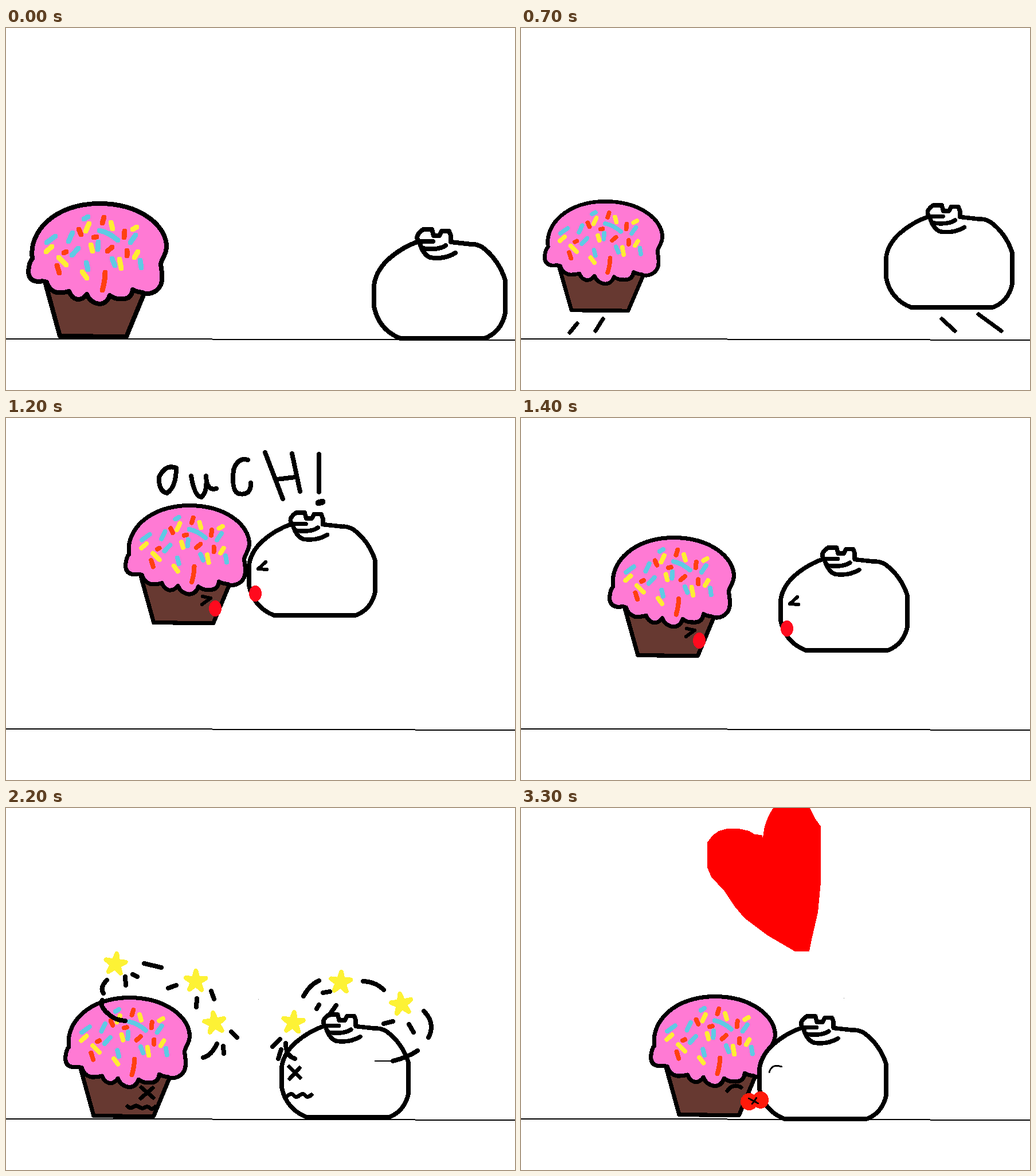
Animation of 888x631 px, one loop 3.4 s. Source, as an HTML page:

```html
<!DOCTYPE html>
<html>
<head>
<meta charset="utf-8">
<style>
html, body { margin: 0; width: 100%; height: 100%; overflow: hidden; background: #fff; }
svg { display: block; width: 888px; height: 631px; shape-rendering: crispEdges; fill: none; stroke-linecap: round; stroke-linejoin: round; }
</style>
</head>
<body>
<svg id="stage" viewBox="0 0 888 631"></svg>
<script>
const STEP = 100, STEPS = 34;
const stage = document.getElementById('stage');

// step, cupcake x y w h, dumpling x y w h
const POSES = [
  [0, 34, 302, 250, 241, 638, 347, 238, 198],
  [3, 34, 322, 247, 221, 636, 362, 243, 183],
  [6, 36, 312, 226, 216, 635, 338, 233, 196],
  [7, 37, 299, 213, 198, 633, 305, 229, 186],
  [10, 140, 190, 220, 208, 507, 200, 229, 187],
  [12, 204, 149, 224, 213, 420, 161, 229, 187],
  [14, 150, 205, 225, 214, 449, 222, 230, 187],
  [16, 99, 327, 225, 215, 477, 356, 230, 187],
  [22, 99, 327, 225, 215, 477, 356, 230, 187],
  [26, 212, 326, 225, 215, 428, 358, 230, 187],
  [30, 222, 325, 225, 215, 412, 359, 230, 187]
];

const line = (d, w = 7, color = '#000', fill = 'none') =>
  `<path d="${d}" stroke="${color}" stroke-width="${w}" fill="${fill}"/>`;
const blob = (x, y, rx, ry, color = '#ff0a1e') =>
  `<ellipse cx="${x}" cy="${y}" rx="${rx}" ry="${ry}" fill="${color}"/>`;
const move = (x, y, body) => `<g transform="translate(${x} ${y})">${body}</g>`;
const fit = ([x, y, w, h], [bx, by, bw, bh], body) =>
  `<g transform="translate(${x} ${y}) scale(${w / bw} ${h / bh}) translate(${-bx} ${-by})">${body}</g>`;

const CUP_BOX = POSES[0].slice(1, 5), BUN_BOX = POSES[0].slice(5);

const CUP =
  line('M69 446L94 537L210 538L243 458', 8, '#000', '#673931') +
  line('M46 402C39 355 85 306 163 306C235 306 280 345 280 381C280 395 271 403 270 412C272 425 274 438 270 448C262 464 245 465 238 461Q228 460 221 456Q219 474 200 472Q190 473 181 466Q176 481 162 481Q146 478 141 464Q134 474 124 473Q114 470 110 459Q100 462 88 461Q75 457 71 443Q63 440 60 442Q40 443 39 425Q40 408 46 402Z', 8, '#000', '#ff7ad4') +
  line('M136 333L143 329M109 372L116 357M71 374L86 363M115 396L126 384M163 353Q179 356 195 370M217 374L226 361M161 373L160 386M140 409L143 421M185 402L190 414M234 405L236 418', 9, '#5fcae4') +
  line('M171 330L168 340M127 351L131 360M153 365L158 364M207 354L206 365M177 389L185 382M211 388V397M101 392L105 390M89 414L93 427M173 426Q173 440 168 457', 9, '#ff4010') +
  line('M145 341L139 354M183 339L186 350M221 351L228 347M70 390L80 381M148 378L151 389M92 400L105 413M133 425L141 436M198 403L201 419M224 400L230 390', 9, '#ffee33');

const BUN =
  line('M720 372Q690 382 665 405Q644 426 642 450V485Q650 526 688 541H835Q864 530 871 497V440Q860 404 831 382Q820 376 812 377L776 373V362L773 354H760L756 362H746L743 351H728Q712 362 720 372', 8, '#000', '#fff') +
  line('M723 372H745M726 384Q755 388 767 379M721 372Q727 395 740 400Q765 404 784 392', 8);

const OUCH =
  line('M297 87Q278 80 267 103Q266 128 281 131Q297 120 297 87M323 101Q329 137 341 138Q352 128 349 101Q350 128 367 123M422 73Q405 68 397 90Q393 128 406 132Q428 136 427 113M452 60L483 141M499 62L513 128M472 107L505 103M546 63V129', 8) +
  line('M545 148L552 146', 11);

const HOP = line('M98 515L85 531M143 507L130 528M734 507L757 528M798 499L838 528', 7);

const HEART = '<path fill="#f00" d="M478 250H503L508 225L518 182L523 130V32L513 18L504 0Q472 -18 440 0Q428 18 424 37L422 52L420 47L408 46L398 40L380 36H360L345 40L334 48L325 60V104L332 120L355 145L373 172L390 192L430 222Z"/>';

// star x y at start, x y at end
const STARS = [
  [181, 299, 191, 272], [313, 321, 331, 302], [345, 380, 364, 375],
  [476, 378, 501, 374], [556, 323, 584, 304], [658, 354, 690, 342]
];
const DRIFT = [[15, -17], [28, -22]]; // how far the swirl lines travel, per character
const SWIRL_IN = [
  'M228 298Q252 299 274 310M339 337L344 346M325 426Q340 422 349 408',
  'M494 342Q503 327 519 321M594 322Q610 323 627 334M695 363Q712 375 700 398M467 407Q464 428 482 429'
];
const SWIRL_OUT = [
  'M241 271L271 278M176 300Q163 313 170 323M208 294L209 309M221 290L229 294M283 314L297 309M358 319L363 333M333 332L332 347M393 390L403 400M368 411Q358 432 344 435M379 415L380 428M168 335Q162 346 180 360Q190 370 208 371',
  'M519 328Q530 308 546 301M553 322L565 320M542 350L546 343M623 302Q645 303 659 317M576 344L564 361M465 416L478 403M475 437L480 421M488 410Q488 432 504 437M659 376L675 372M703 377L711 391M729 354Q750 375 737 400M675 441Q700 435 718 423'
];
const SPREAD = { 17: 0, 18: 0.2, 19: 0.35, 20: 0.35, 21: 0.7, 22: 1 };

function star(x, y, size, turn) {
  const points = Array.from({ length: 10 }, (_, i) => {
    const r = i % 2 ? 6 : size, a = turn + i * Math.PI / 5;
    return (x + r * Math.sin(a)).toFixed(1) + ' ' + (y - r * Math.cos(a)).toFixed(1);
  });
  return line('M' + points.join('L') + 'Z', 8, '#fdf235', '#fdf235');
}

function dizzy(k) {
  const swirl = DRIFT.map(([dx, dy], i) => k > 0.5
    ? move(dx * (k - 1), dy * (k - 1), line(SWIRL_OUT[i], 8))
    : move(dx * k, dy * k, line(SWIRL_IN[i], 8)));
  const stars = STARS.map(([x, y, u, v], i) =>
    star(x + (u - x) * k, y + (v - y) * k, 16 + 2 * k, 0.15 * Math.sin(i * 2 + 1)));
  return swirl.join('') + (k === 1 ? line('M644 441H676', 2) : '') + stars.join('');
}

function cupFace(s, x, y) {
  if (s < 12) return '';
  if (s < 16) return move(x - 204, y - 149, line('M343 311L357 314L342 325', 6) + blob(365, 332, 11, 14));
  const dot = '<path fill="#777" d="M440 333h1v1h-1z"/>';
  if (s < 23) {
    const mouth = s > 20 ? 'M212 520q5 5 10 1t10 0t10 1t9 1t9 -2' : 'M222 521q5 -5 9 0t9 0t9 0t10 -1';
    return move(x - 99, y - 327, line('M236 487L257 505M256 488L235 506', 7) + line(mouth, 7) + dot);
  }
  const lips = s < 28 ? blob(381, 507, 9, 9, '#ff2a0a') + blob(383, 519, 11, 11, '#ff2a0a') + line('M379 517L389 512', 2) : '';
  return move(x - 212, y - 326, line('M350 494Q360 480 374 488', 7) + lips + move(113, -1, dot));
}

function bunFace(s, x, y) {
  if (s < 12) return '';
  if (s < 16) return move(x - 420, y - 161, line('M453 251L440 263L455 264', 6) + blob(435, 306, 11, 14));
  if (s < 28) return move(x - 477, y - 356, line('M494 451L513 470M512 453L495 472', 7) + line('M492 501q6 -5 10 0t10 0t10 0t11 -1', 7));
  return move(x - 412, y - 359, line('M433 461Q437 445 455 451', 3));
}

const KISS = blob(398, 512, 15, 15, '#ff1a0a') + blob(418, 509, 14, 15, '#ff1a0a') +
  line('M397 506L414 515M403 516L411 505', 3);

function heart(u) {
  const size = 0.7 + 0.3 * u;
  return `<g transform="translate(${460 + 30 * u} ${550 - 300 * u}) scale(${size}) translate(-490 -250)">${HEART}</g>`;
}

function poseAt(s) {
  const i = POSES.findIndex(p => p[0] > s);
  if (i < 0) return POSES[POSES.length - 1].slice(1);
  const a = POSES[i - 1], b = POSES[i], k = (s - a[0]) / (b[0] - a[0]);
  return a.map((v, j) => v + (b[j] - v) * k).slice(1);
}

function scene(s) {
  const pose = poseAt(s), cup = pose.slice(0, 4), bun = pose.slice(4);
  return line('M-2 541.5L890 544', 2) +
    fit(cup, CUP_BOX, CUP) + cupFace(s, cup[0], cup[1]) +
    fit(bun, BUN_BOX, BUN) + bunFace(s, bun[0], bun[1]) +
    (s === 7 || s === 8 ? HOP : '') +
    (s === 12 ? OUCH : '') +
    (s in SPREAD ? dizzy(SPREAD[s]) : '') +
    (s >= 28 ? KISS : '') +
    (s > 30 ? heart((s - 30) / 3) : '');
}

let shown = -1;
const start = performance.now();
function tick() {
  const s = Math.floor((performance.now() - start) / STEP) % STEPS;
  if (s !== shown) stage.innerHTML = scene(shown = s);
  requestAnimationFrame(tick);
}
tick();
</script>
</body>
</html>
```
